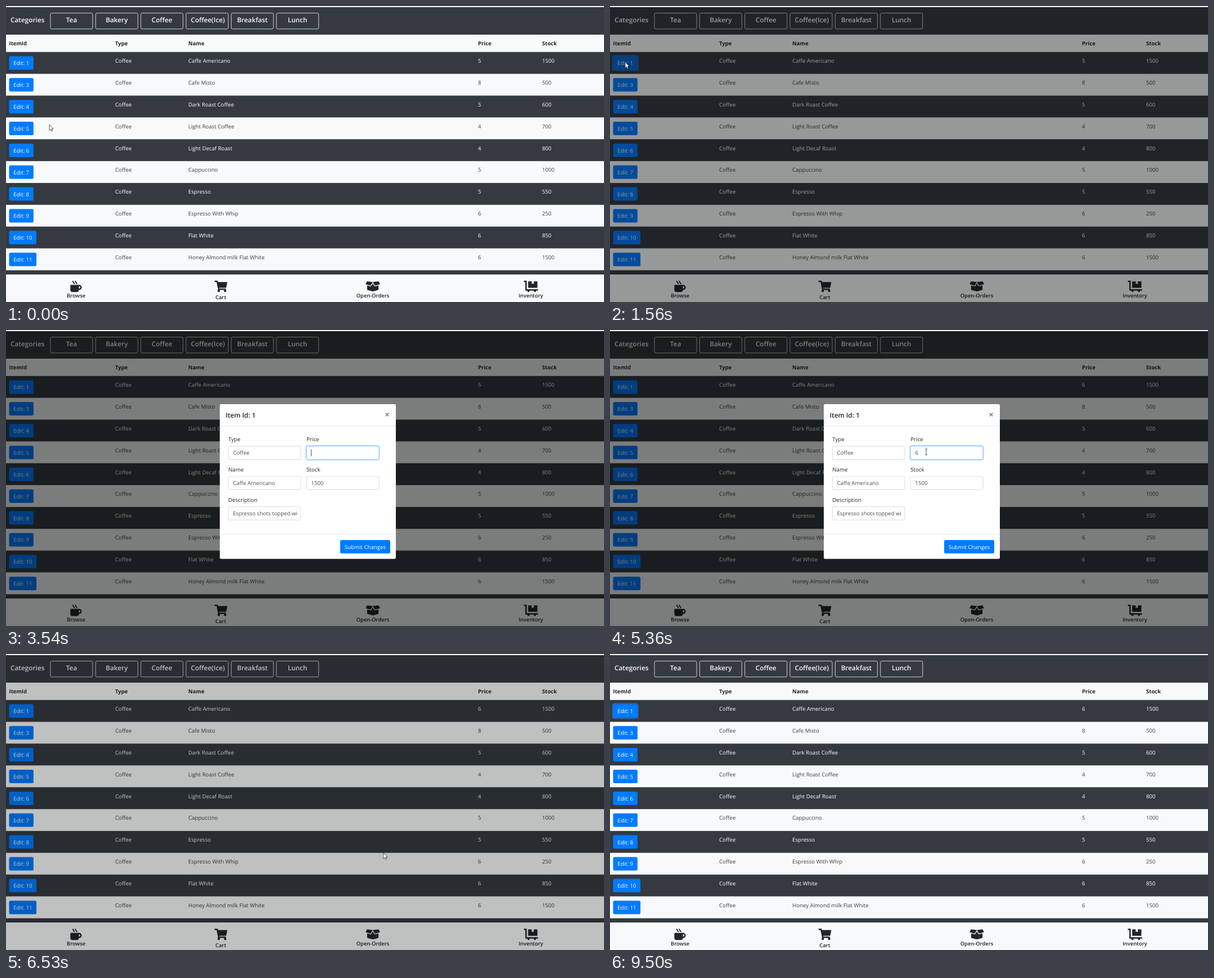
An HTML page that plays this animation: 1063 by 527 pixels, repeating every 9.88 s.

```html
<!DOCTYPE html>
<html lang="en">
<head>
<meta charset="utf-8">
<title>Inventory</title>
<style>
  html, body { margin: 0; width: 100%; height: 100%; overflow: hidden; background: #fff; }
  svg { display: block; width: 1063px; height: 527px; }
  text {
    font-family: "Open Sans", "Noto Sans", sans-serif;
    font-size: 9.68px;
    text-rendering: geometricPrecision;
    white-space: pre;
  }
  .head { font-size: 11.8px; font-weight: 600; }
  .th { font-size: 9.55px; font-weight: 700; }
  .nav { font-size: 9.4px; font-weight: 600; }
  .close { font-size: 15px; font-weight: 700; }
</style>
</head>
<body>
<svg id="stage" viewBox="0 0 1063 527"></svg>
<script>
const LOOP = 9880;
const DARK = '#343a40', LIGHT = '#f8f9fa', INK = '#212529';
const BLUE = '#007bff', HOVER = '#0069d9', FIELD = '#495057';
const stage = document.getElementById('stage');

function add(parent, tag, attrs, content) {
  const el = document.createElementNS('http://www.w3.org/2000/svg', tag);
  for (const key in attrs) el.setAttribute(key, attrs[key]);
  if (content !== undefined) el.textContent = content;
  parent.appendChild(el);
  return el;
}
const rect = (p, x, y, width, height, fill, more) =>
  add(p, 'rect', { x, y, width, height, fill, ...more });
const label = (p, x, y, str, fill = INK, cls = '', anchor = 'start') =>
  add(p, 'text', { x, y, fill, class: cls, 'text-anchor': anchor }, str);

// Category bar
const page = add(stage, 'g', {});
rect(page, 0, 0, 1063, 527, LIGHT);
rect(page, 0, 2, 1063, 49, DARK);
label(page, 8, 29, 'Categories', LIGHT, 'head');
['Tea', 'Bakery', 'Coffee', 'Coffee(Ice)', 'Breakfast', 'Lunch'].forEach((name, i) => {
  const x = 79 + i * 80.35;
  rect(page, x, 12.6, 75, 28.3, 'none', { rx: 2.5, stroke: LIGHT, 'stroke-width': 0.8 });
  label(page, x + (i === 3 ? 38.7 : 37.5), 29, name, LIGHT, 'head', 'middle');
});

// Table
const cols = [5.5, 194, 324, 839, 953];
['ItemId', 'Type', 'Name', 'Price', 'Stock'].forEach((name, i) =>
  label(page, cols[i], 70.2, name, INK, 'th'));
rect(page, 0, 81, 1063, 1, '#d5d9dd');

const items = [
  [1, 'Caffe Americano', 5, 1500], [3, 'Cafe Misto', 8, 500],
  [4, 'Dark Roast Coffee', 5, 600], [5, 'Light Roast Coffee', 4, 700],
  [6, 'Light Decaf Roast', 4, 800], [7, 'Cappuccino', 5, 1000],
  [8, 'Espresso', 5, 550], [9, 'Espresso With Whip', 6, 250],
  [10, 'Flat White', 6, 850], [11, 'Honey Almond milk Flat White', 6, 1500]
];
const rowTop = i => 82 + i * 38.85;
let priceCell, editButton, editRing;
items.forEach(([id, name, price, stock], i) => {
  const y = rowTop(i), odd = i % 2, ink = odd ? '#3c4146' : '#fff';
  if (!odd) rect(page, 0, y, 1063, 38.85, DARK);
  rect(page, 0, y, 1063, 0.65, odd ? '#dee2e6' : '#454d55');
  const width = id < 10 ? 43.4 : 48.6;
  if (!i) editRing = rect(page, 4.5, y + 6.5, 45.4, 26, 'none',
    { rx: 3.4, stroke: '#268fff', 'stroke-opacity': 0.5, 'stroke-width': 2 });
  const button = rect(page, 5.5, y + 7.5, width, 24, BLUE, { rx: 2.5 });
  label(page, 5.5 + width / 2, y + 23.4, 'Edit: ' + id, '#fff', '', 'middle');
  label(page, cols[1], y + 19.1, 'Coffee', ink);
  label(page, cols[2], y + 19.1, name, ink);
  const cell = label(page, cols[3], y + 19.1, price, ink);
  label(page, cols[4], y + 19.1, stock, ink);
  if (!i) { priceCell = cell; editButton = button; }
});
rect(page, 0, rowTop(10), 1063, 7.5, DARK);

// Bottom navigation
rect(page, 0, 478, 1063, 49, LIGHT);
const icon = (x, y) => add(page, 'g', { transform: `translate(${x} ${y}) scale(.0395)`, fill: INK });
const path = (p, d, more) => add(p, 'path', { d, ...more });

const mug = icon(114.4, 489);
path(mug, 'M400 192H32Q0 192 0 224V416Q0 512 96 512H288Q384 512 384 416H400A112 112 0 0 0 400 192ZM400 352H384V256H400A48 48 0 0 1 400 352Z',
  { 'fill-rule': 'evenodd' });
path(mug, 'M108 8C112 92 172 70 180 152M220 8C224 92 284 70 292 152',
  { fill: 'none', stroke: INK, 'stroke-width': 46 });

const cart = icon(370.6, 489);
path(cart, 'M24 0H126Q146 0 150 19L159 64H552Q580 64 575 93L528 301Q524 320 505 320H212L218 352H486Q514 352 510 381L500 416H166L94 64H24Q0 64 0 40V24Q0 0 24 0Z');
for (const cx of [192, 480]) add(cart, 'circle', { cx, cy: 456, r: 56 });

const box = icon(639.4, 489);
path(box, 'M426 256Q399 256 384 233L320 126L256 233Q237 264 201 254L64 215V393Q64 418 88 424L304 478Q320 482 336 478L552 424Q576 418 576 393V215L439 254ZM638 144L587 41Q582 31 570 32L320 64L412 216Q418 226 430 223L628 167Q645 161 638 144ZM53 41L2 144Q-5 161 12 167L210 223Q222 226 228 216L320 64L70 32Q58 31 53 41Z');

const trolley = icon(920.6, 489);
path(trolley, 'M208 320H592Q608 320 608 304V48Q608 32 592 32H448V160L400 128L352 160V32H208Q192 32 192 48V304Q192 320 208 320ZM624 384H128V16Q128 0 112 0H16Q0 0 0 16V48Q0 64 16 64H64V432Q64 448 80 448H624Q640 448 640 432V400Q640 384 624 384Z');
for (const cx of [208, 496]) add(trolley, 'circle', { cx, cy: 464, r: 48 });

[['Browse', 124.6, 519.4], ['Cart', 381.8, 522], ['Open-Orders', 652, 519.4], ['Inventory', 933, 519.4]]
  .forEach(([name, x, y]) => label(page, x, y, name, INK, 'nav', 'middle'));

rect(stage, 0, 0, 1063, 2, '#fdfdfd');
const backdrop = rect(stage, 0, 2, 1063, 525, '#000');

// Dialog
const modal = add(stage, 'g', {});
rect(modal, 380, 132, 313, 275.6, '#fff', { rx: 2.8 });
label(modal, 390.4, 156.2, 'Item Id: 1', INK, 'head');
label(modal, 677.5, 156.2, '×', '#7f7f7f', 'close', 'middle');
rect(modal, 380, 170, 313, 0.8, '#dee2e6');
rect(modal, 380, 363, 313, 0.8, '#dee2e6');

const fields = [
  ['Type', 'Coffee', 395, 206.6], ['Price', '5', 534, 206.6],
  ['Name', 'Caffe Americano', 395, 260.4], ['Stock', '1500', 534, 260.4],
  ['Description', 'Espresso shots topped wi', 395, 314.3]
];
let priceBox, priceRing, priceValue;
fields.forEach(([name, value, x, y]) => {
  const isPrice = name === 'Price';
  label(modal, x + 0.3, y - 8.2, name);
  if (isPrice) priceRing = rect(modal, x - 0.8, y - 0.8, 130.4, 25.6, 'none',
    { rx: 3.4, stroke: '#bfdeff', 'stroke-width': 2.2 });
  const frame = rect(modal, x + 0.3, y + 0.3, 128.6, 23.6, '#fff',
    { rx: 2.5, stroke: '#ced4da', 'stroke-width': 0.8 });
  const txt = label(modal, x + 8.4, y + 15.8, value, FIELD);
  if (isPrice) { priceBox = frame; priceRing.style.opacity = 0; priceValue = txt; }
});
const caret = rect(modal, 542, 212.4, 0.8, 12.2, INK);
const submit = rect(modal, 594, 374, 89, 23.8, BLUE, { rx: 2.5 });
label(modal, 638.5, 389.5, 'Submit Changes', '#fff', '', 'middle');

// Pointer
const pointer = add(stage, 'g', {});
const arrow = path(pointer, 'M0 0V10.4L2.4 8.3L4 11.9L5.6 11.2L4.1 7.7H7.3Z',
  { fill: '#fff', stroke: '#111', 'stroke-width': 0.7 });
const beam = path(pointer, 'M-2 -5.2H-.6L0 -4.7L.6 -5.2H2M0 -4.7V4.7M-2 5.2H-.6L0 4.7L.6 5.2H2',
  { fill: 'none', stroke: '#333', 'stroke-width': 0.9 });

const clamp = v => Math.max(0, Math.min(1, v));
const ramp = (t, from, to) => clamp((t - from) / (to - from));
const within = (t, from, to) => t >= from && t < to;
const smooth = u => u * u * (3 - 2 * u);
const inside = (p, x, y, w, h) => p[0] >= x && p[0] <= x + w && p[1] >= y && p[1] <= y + h;

// time, x, y
const route = [
  [60, 77, 211], [730, 27, 100], [1900, 27, 100], [2450, 515, 216], [3050, 562, 217],
  [5360, 562, 217], [6150, 640, 382], [6340, 640, 382], [6650, 686, 340], [7480, 871, 97]
];
function pointerAt(t) {
  if (t >= 8560) {
    const u = smooth(ramp(t, 8560, 9440));
    return [871 + 162 * u, 97 + 418 * u];
  }
  if (t >= 7480) {
    const a = ramp(t, 7480, 8560) * 2 * Math.PI;
    return [849 + 22 * Math.cos(a), 97 + 19 * Math.sin(a)];
  }
  let i = 0;
  while (i < route.length - 2 && t >= route[i + 1][0]) i++;
  const [t0, x0, y0] = route[i], [t1, x1, y1] = route[i + 1];
  const u = smooth(ramp(t, t0, t1));
  return [x0 + (x1 - x0) * u, y0 + (y1 - y0) * u];
}

function draw(t) {
  const p = pointerAt(t);
  const modalOn = within(t, 1596, 6380);

  backdrop.style.opacity = 0.5 * (ramp(t, 1443, 1593) - ramp(t, 6450, 6600));
  modal.style.opacity = modalOn ? ramp(t, 1596, 1746) - ramp(t, 6250, 6380) : 0;
  const left = 1 - ramp(t, 1596, 1896);
  modal.setAttribute('transform', `translate(0 ${-31.6 * left * left})`);

  editRing.style.opacity = t < 4000
    ? ramp(t, 1380, 1520) - ramp(t, 1900, 2050)
    : ramp(t, 6670, 6820);
  editButton.setAttribute('fill', t < 1900 && inside(p, 5, 89, 44, 25) ? HOVER : BLUE);

  // Price edit
  const focus = ramp(t, 2960, 3110) - ramp(t, 6080, 6230);
  priceRing.style.opacity = focus;
  priceBox.setAttribute('stroke', focus > 0.5 ? '#80bdff' : '#ced4da');
  priceValue.textContent = t < 3540 ? '5' : t < 4500 ? '' : '6';
  priceCell.textContent = t < 3800 ? '5' : t < 4650 ? '' : '6';
  caret.style.opacity = within(t, 3100, 4100) || within(t, 4500, 5360) ? 1 : 0;
  caret.setAttribute('x', within(t, 3540, 4500) ? 542 : 548.2);
  submit.setAttribute('fill', modalOn && inside(p, 594, 374, 89, 24) ? HOVER : BLUE);

  const typing = modalOn && fields.some(f => inside(p, f[2], f[3], 129, 24));
  arrow.style.display = typing ? 'none' : '';
  beam.style.display = typing ? '' : 'none';
  pointer.style.display = within(t, 3540, 5360) || t >= 9500 ? 'none' : '';
  pointer.setAttribute('transform', `translate(${p[0]} ${p[1]})`);
}

const start = performance.now();
function tick() {
  draw((performance.now() - start) % LOOP);
  requestAnimationFrame(tick);
}
tick();
</script>
</body>
</html>
```
